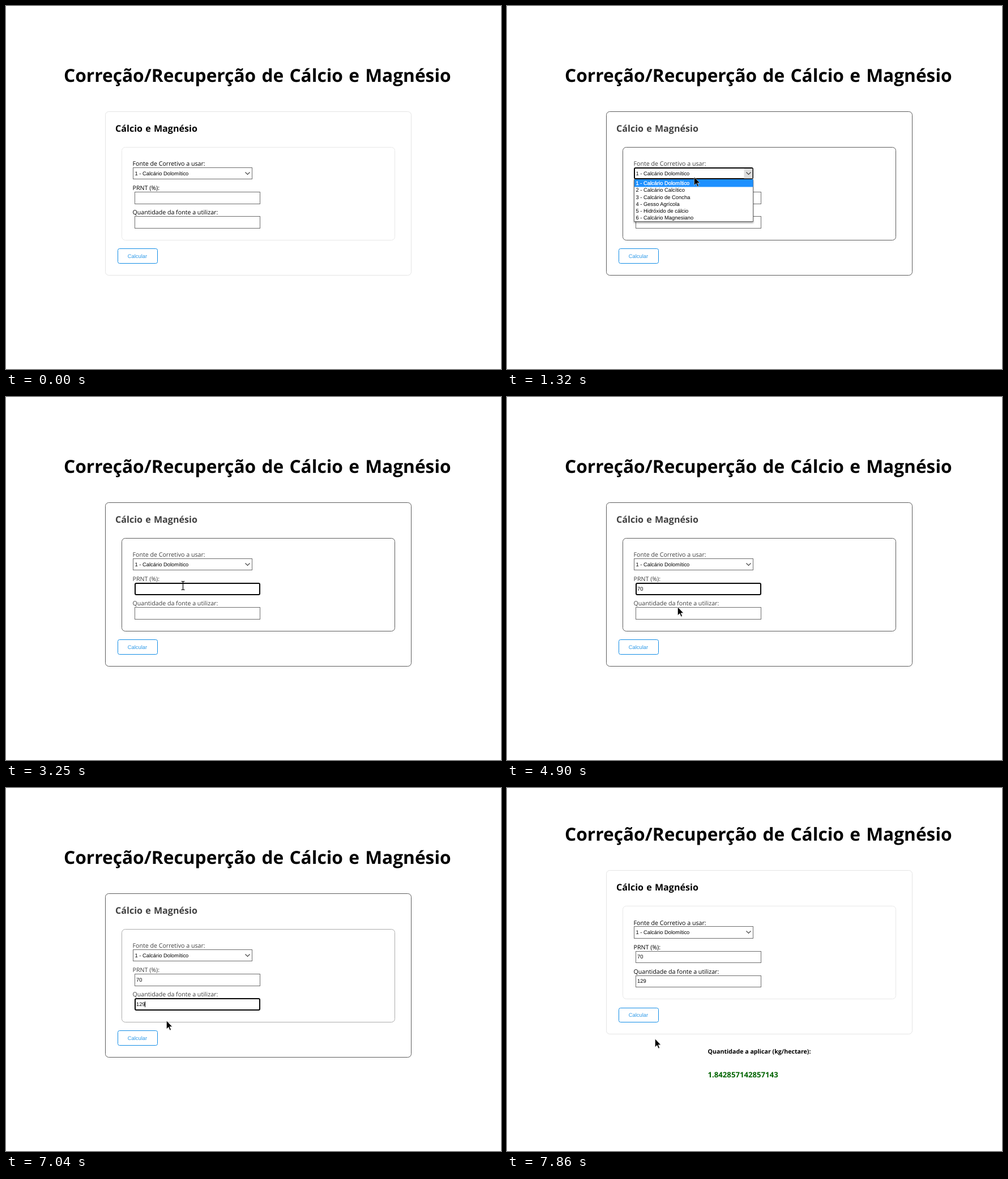
An HTML page for the animation above (8 s loop, 874 by 641 pixels).

```html
<!DOCTYPE html>
<html lang="pt">
<head>
<meta charset="utf-8">
<title>Cálcio e Magnésio</title>
<style>
  html, body { margin: 0; width: 100%; height: 100%; overflow: hidden; background: #fff; }
  svg { display: block; width: 874px; height: 641px; text-rendering: geometricPrecision; }
  .head { font: bold 31.7px "Open Sans", "Noto Sans", sans-serif; word-spacing: 2px; }
  .legend { font: bold 16.1px "Open Sans", "Noto Sans", sans-serif; word-spacing: 1px; }
  .label { font: 10.65px "Open Sans", "Noto Sans", sans-serif; }
  .field { font: 9.4px "Liberation Sans", Arial, sans-serif; }
  .result { font: bold 10.65px "Open Sans", "Noto Sans", sans-serif; }
  .value { font: bold 13.2px "Open Sans", "Noto Sans", sans-serif; fill: #006400; }
</style>
</head>
<body>
<svg viewBox="0 0 874 641" xmlns="http://www.w3.org/2000/svg">
  <defs>
    <filter id="shadow" x="-10%" y="-10%" width="120%" height="125%">
      <feDropShadow dx="0" dy="2" stdDeviation="1.8" flood-opacity=".4"/>
    </filter>
  </defs>
  <text class="head" x="102" data-y="134">Correção/Recuperção de Cálcio e Magnésio</text>
  <rect id="card" rx="6" fill="none"/>
  <rect id="inner" rx="6" fill="none"/>
  <g id="ink">
    <text class="legend" x="193" data-y="222">Cálcio e Magnésio</text>
    <text class="label" x="223.5" data-y="282.3">Fonte de Corretivo a usar:</text>
    <text class="label" x="223.5" data-y="325.3">PRNT (%):</text>
    <text class="label" x="223.5" data-y="368.3">Quantidade da fonte a utilizar:</text>
  </g>
  <rect id="select" fill="#fff"/>
  <rect id="knob" x="418.5" y="287" width="15" height="17.5" fill="#dedede"/>
  <text class="field" x="227.5" data-y="299">1 - Calcário Dolomítico</text>
  <path id="chevron" d="M422.5 0l4 4 4-4" fill="none" stroke="#444" stroke-width="1.2"/>
  <rect id="prnt" fill="#fff"/>
  <rect id="qty" fill="#fff"/>
  <text id="prntText" class="field" x="230" data-y="342"></text>
  <text id="qtyText" class="field" x="230" data-y="385"></text>
  <rect id="caret" width="1" height="10"/>
  <rect id="button" rx="3" stroke="#128de6"/>
  <text id="buttonText" class="field" x="214.8" data-y="445">Calcular</text>
  <g id="menu">
    <rect x="224.5" y="306.5" width="210" height="74" fill="#fff" stroke="#6b6b6b" filter="url(#shadow)"/>
    <rect x="225" y="306" width="209.5" height="13.5" fill="#1e90ff"/>
  </g>
  <g id="result">
    <text class="result" x="354.5" y="469">Quantidade a aplicar (kg/hectare):</text>
    <text class="value" x="354.5" y="511">1.842857142857143</text>
  </g>
  <circle id="click" r="11" fill="#f5f000" fill-opacity=".52"/>
  <g id="cursor">
    <path id="arrow" d="M.5 0V14.5L4 11.3 6.3 16.8 8.4 15.9 6.1 10.5H10.5Z" stroke="#fff" stroke-width=".5"/>
    <path id="beam" d="M-3-7.500H-1L0-6.500 1-7.500H3M0-6.500V6.500M-3 7.500H-1L0 6.500 1 7.500H3" fill="none" stroke="#000" stroke-width="1.2"/>
    <path id="hand" d="M-1.500 9V.8Q-1.500-.8 0-.8T1.500.8V6Q3 5 4 6.500 5.500 5.500 6.500 7 8.500 6.500 9 8.500V13L7.500 18.500H-.5L-5 12Q-6 9.500-4 9.500L-1.500 12ZM1.500 6V9.500M4 6.500V10M6.500 7V10.500" fill="#fff" stroke="#000"/>
  </g>
</svg>
<script>
const LOOP = 8000, STEP = 70, RESULT = 7590, LIFT = 40.67;
const el = {};
document.querySelectorAll('[id]').forEach(n => el[n.id] = n);
const lines = document.querySelectorAll('[data-y]');

// left, top, right, bottom; rows are snapped to whole pixels when drawn
const boxes = {
  card: [175, 186, 716, 476],
  inner: [204, 249, 687, 414],
  select: [224, 285, 435, 306.4],
  prnt: [227, 328.3, 449, 349.7],
  qty: [227, 371.4, 449, 392.8],
  button: [197, 428.3, 268, 454.7]
};

const options = ['Calcário Dolomítico', 'Calcário Calcítico', 'Calcário de Concha',
  'Gesso Agrícola', 'Hidróxido de cálcio', 'Calcário Magnesiano'];
options.forEach((name, i) => {
  const line = document.createElementNS('http://www.w3.org/2000/svg', 'text');
  set(line, { class: 'field', x: 227.5, y: 316.2 + 12.2 * i, fill: i ? '#000' : '#fff' });
  if (!i) set(line, { stroke: '#fff', 'stroke-width': 0.3 });
  line.textContent = `${i + 1} - ${name}`;
  el.menu.append(line);
});

// time, x, y of the pointer
const path = [
  [60, 808, 622], [130, 788, 560], [200, 738, 412], [270, 686, 315], [340, 626, 263],
  [480, 470, 154], [550, 400, 118], [620, 342, 145], [690, 321, 208], [830, 327, 285],
  [970, 330, 302], [1660, 330, 302], [1780, 331, 311], [2330, 331, 311], [2520, 312, 333],
  [4760, 312, 333], [5030, 290, 411], [5240, 288, 405], [5310, 288, 405], [5430, 293, 384],
  [6830, 293, 384], [7110, 275, 432], [7250, 261, 443]
];
const clicks = [[1120, 1250], [2730, 2790], [5580, 5700], [7390, 7590]];
const caretOn = [[2730, 3250], [3780, 4440], [4970, 5430], [5580, 6640], [6840, 7370]];

function set(node, attrs) {
  for (const k in attrs) node.setAttribute(k, attrs[k]);
}
function show(node, on) {
  node.setAttribute('visibility', on ? 'visible' : 'hidden');
}
const ramp = (t, a, b) => Math.min(1, Math.max(0, (t - a) / (b - a)));
const gray = (a, b, k) => {
  const v = Math.round(a + (b - a) * k);
  return `rgb(${v},${v},${v})`;
};
const within = (t, spans) => spans.some(([a, b]) => t >= a && t < b);
const typed = (t, text, times) => text.slice(0, times.filter(s => t >= s).length);

function pointer(t) {
  const q = Math.floor((t + 10) / STEP) * STEP - 10;
  let i = path.findIndex(p => p[0] > q);
  if (i < 0) i = path.length;
  const a = path[Math.max(0, i - 1)], b = path[i] || a;
  const k = b === a ? 0 : ramp(q, a[0], b[0]);
  return [a[1] + (b[1] - a[1]) * k, a[2] + (b[2] - a[2]) * k].map(Math.round);
}

// Outlines a box just inside its edges.
function frame(id, lift, stroke, width = 1) {
  const [l, top, r, bottom] = boxes[id];
  const y0 = Math.round(top - lift), y1 = Math.round(bottom - lift);
  set(el[id], {
    x: l + width / 2, y: y0 + width / 2,
    width: r - l - width, height: y1 - y0 - width,
    stroke, 'stroke-width': width
  });
}

function layout(lift) {
  lines.forEach(n => set(n, { y: Math.round(n.dataset.y - lift) }));
  set(el.chevron, { transform: `translate(0 ${Math.round(293 - lift) + 0.5})` });
}

function draw(t) {
  const done = t >= RESULT;
  const lift = done ? LIFT : 0;
  const [x, y] = pointer(t);
  const open = t >= 1250 && t < 2190;
  const focus = t < 1120 ? '' : t < 2730 ? 'select' : t < 5580 ? 'prnt' : t < 7390 ? 'qty' : '';
  const hit = id => {
    const [l, top, r, bottom] = boxes[id];
    return !done && !open && x >= l && x <= r && y >= top && y <= bottom;
  };

  layout(lift);
  show(el.result, done);

  const card = ramp(t, 740, 970) - ramp(t, RESULT, 7790);
  const inner = ramp(t, 780, 970) - ramp(t, 6950, 7110);
  frame('card', lift, gray(228, 92, card));
  frame('inner', lift, gray(232, 92, inner));
  set(el.ink, { fill: gray(0, 64, card) });

  for (const id of ['select', 'prnt', 'qty']) {
    const focused = focus === id;
    frame(id, lift, focused ? '#050505' : hit(id) ? '#505050' : '#6e6e6e', focused ? 2 : 1);
    set(el[id], { rx: focused ? 2 : 0 });
  }
  show(el.menu, open);
  show(el.knob, open);

  const values = {
    prnt: typed(t, '70', [3840, 3910]),
    qty: typed(t, '129', [5840, 6040, 6840])
  };
  el.prntText.textContent = values.prnt;
  el.qtyText.textContent = values.qty;
  const editing = focus in values;
  show(el.caret, editing && within(t, caretOn));
  if (editing) {
    set(el.caret, { x: 230 + Math.round(values[focus].length * 5.1), y: focus === 'prnt' ? 334 : 377 });
  }

  const hot = hit('button');
  frame('button', lift, '#128de6');
  set(el.button, { fill: hot ? '#128fee' : '#fff' });
  set(el.buttonText, { fill: hot ? '#fff' : '#2c99e8' });

  const beam = hit('prnt') || hit('qty');
  show(el.arrow, t >= 70 && !beam && !hot);
  show(el.beam, beam);
  show(el.hand, hot);
  set(el.cursor, { transform: `translate(${x + (beam ? 0.5 : 0)} ${y})` });
  show(el.click, within(t, clicks));
  set(el.click, { cx: x, cy: y });
}

const start = performance.now();
function tick() {
  draw((performance.now() - start) % LOOP);
  requestAnimationFrame(tick);
}
tick();
</script>
</body>
</html>
```
